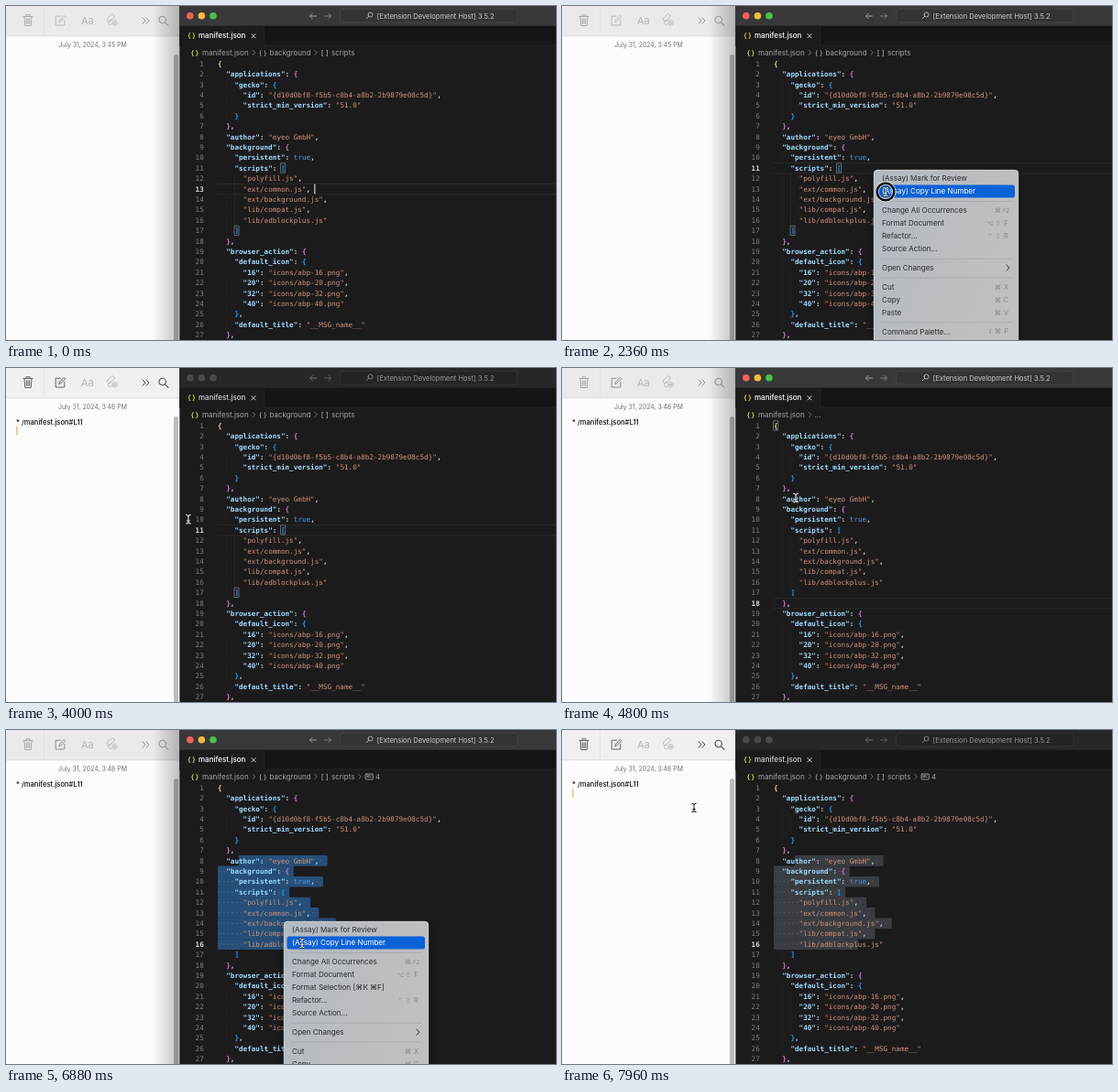
Animation, 600 px wide and 365 px high, one loop 8000 ms. Source, as an HTML page with a canvas:

```html
<!DOCTYPE html>
<html lang="en">
<head>
<meta charset="utf-8">
<title>Copy line number</title>
<style>
html, body { margin: 0; width: 100%; height: 100%; overflow: hidden; background: #1c1b1c; }
canvas { display: block; width: 600px; height: 365px; }
</style>
</head>
<body>
<canvas id="stage"></canvas>
<script>
const W = 600, H = 365, LOOP = 8000;
const canvas = document.getElementById('stage');
const ctx = canvas.getContext('2d');
const dpr = Math.max(1, window.devicePixelRatio || 1);
canvas.width = W * dpr;
canvas.height = H * dpr;

const UI = 'Inter, Roboto, sans-serif';
const MONO = '"DejaVu Sans Mono", monospace';
const SYMBOL = '"DejaVu Sans", sans-serif';
const EDGE = 189.5;
const LEFT = 231, CHAR = 4.6, TOP = 63, ROW = 11.4;
const BRACKETS = ['#e8d98a', '#da70d6', '#179fff'];

// A comma at the end of a line is followed by one space.
const code = `{
  "applications": {
    "gecko": {
      "id": "{d10d0bf8-f5b5-c8b4-a8b2-2b9879e08c5d}",
      "strict_min_version": "51.0"
    }
  },
  "author": "eyeo GmbH",
  "background": {
    "persistent": true,
    "scripts": [
      "polyfill.js",
      "ext/common.js",
      "ext/background.js",
      "lib/compat.js",
      "lib/adblockplus.js"
    ]
  },
  "browser_action": {
    "default_icon": {
      "16": "icons/abp-16.png",
      "20": "icons/abp-20.png",
      "32": "icons/abp-32.png",
      "40": "icons/abp-40.png"
    },
    "default_title": "__MSG_name__"
  },`.split('\n').map(line => line.endsWith(',') ? line + ' ' : line);

const tokens = tokenize(code);

// Pointer stops: time, x, y
const path = [
  [240, 536, 380], [1240, 340, 178], [1560, 340, 178], [2000, 353, 203],
  [2440, 353, 203], [2960, 137, 122], [3880, 137, 122], [4200, 330, 257],
  [4360, 330, 257], [4760, 255, 142], [5080, 255, 142], [5560, 324, 235],
  [5880, 324, 235], [6160, 302, 208], [6400, 302, 208], [6720, 323, 233],
  [7080, 323, 233], [7420, 139, 84], [7560, 139, 84], [7760, 144, 85]
];
// Click rings: start, end, is right button
const clicks = [
  [1360, 1560, true], [2240, 2400, false], [3000, 3160, false], [4240, 4360, false],
  [5080, 5680, false], [6200, 6360, true], [6920, 7080, false], [7440, 7560, false]
];
// Menus: open, close, x, y
const menus = [[1520, 2400, 340, 179], [6360, 7080, 303, 209]];

const within = (t, a, b) => t >= a && t < b;
const colX = col => LEFT + col * CHAR;
const rowY = line => TOP + (line - 1) * ROW;

function tokenize(lines) {
  let depth = 0;
  return lines.map(line => {
    const found = [];
    for (const m of line.matchAll(/"[^"]*"|true|[{}\[\]]|[:,]/g)) {
      const s = m[0];
      const isKey = s[0] === '"' && line[m.index + s.length] === ':';
      let color = '#d6d6d6', weight = 700;
      if (isKey) color = '#9cdcfe';
      else if (s[0] === '"') [color, weight] = ['#ce9178', 400];
      else if (s === 'true') [color, weight] = ['#569cd6', 400];
      else if ('{['.includes(s)) color = BRACKETS[depth++ % 3];
      else if ('}]'.includes(s)) color = BRACKETS[--depth % 3];
      found.push({ s, col: m.index, color, weight });
    }
    return found;
  });
}

function text(s, x, y, size, color, align = 'left', family = UI, weight = 400) {
  ctx.font = `${weight} ${size}px ${family}`;
  ctx.textRendering = family === MONO ? 'geometricPrecision' : 'auto';
  ctx.fillStyle = color;
  ctx.textAlign = align;
  ctx.textBaseline = 'alphabetic';
  ctx.fillText(s, x, y + size * 0.36);
}

function rect(x, y, w, h, color) {
  ctx.fillStyle = color;
  ctx.fillRect(x, y, w, h);
}

function round(x, y, w, h, r, fill, stroke) {
  ctx.beginPath();
  ctx.roundRect(x, y, w, h, r);
  if (fill) { ctx.fillStyle = fill; ctx.fill(); }
  if (stroke) { ctx.strokeStyle = stroke; ctx.lineWidth = 0.7; ctx.stroke(); }
}

function gradient(x0, y0, x1, y1, from, to) {
  const g = ctx.createLinearGradient(x0, y0, x1, y1);
  g.addColorStop(0, from);
  g.addColorStop(1, to);
  return g;
}

function circle(x, y, r, fill) {
  ctx.beginPath();
  ctx.arc(x, y, r, 0, Math.PI * 2);
  ctx.fillStyle = fill;
  ctx.fill();
}

function stroke(d, color, width = 1) {
  ctx.strokeStyle = color;
  ctx.lineWidth = width;
  ctx.lineCap = ctx.lineJoin = 'round';
  ctx.stroke(new Path2D(d));
}

function chevron(x, y, color = '#858585') {
  stroke(`M${x - 1.2} ${y - 2.5}l2.5 2.5l-2.5 2.5`, color, 0.8);
}

function lens(x, y, r, color, width, dir) {
  const k = r * 0.7;
  stroke(`M${x - r} ${y}a${r} ${r} 0 1 0 ${2 * r} 0a${r} ${r} 0 1 0 ${-2 * r} 0` +
    `M${x + dir * k} ${y + k}l${dir * r} ${r}`, color, width);
}

function pointer(t) {
  if (t < path[0][0]) return null;
  const i = path.findIndex(p => p[0] > t);
  if (i < 0) return path[path.length - 1].slice(1);
  const [t0, x0, y0] = path[i - 1], [t1, x1, y1] = path[i];
  const u = (t - t0) / (t1 - t0), e = u * u * (3 - 2 * u);
  return [x0 + (x1 - x0) * e, y0 + (y1 - y0) * e];
}

function stateAt(t) {
  const notes = within(t, 3120, 4280) || t >= 7480;
  const s = { notes, pos: pointer(t), line: 13, col: 23, since: 0, pair: 'scripts', crumbs: 'scripts' };
  if (t >= 1400) Object.assign(s, { line: 11, col: 16, since: 1400 });
  if (t >= 4280) Object.assign(s, { line: 18, col: 4, since: 4280, pair: 'root', crumbs: 'root' });
  if (t >= 5080) {
    const [x, y] = t < 5600 ? s.pos : [324, 235];
    s.line = Math.max(8, Math.round((y - TOP) / ROW) + 1);
    s.col = Math.min(Math.round((x - LEFT) / CHAR), code[s.line - 1].length);
    s.since = t;
    s.pair = '';
    s.selected = s.line > 8 || s.col > 5;
    if (t >= 5900) s.crumbs = 'item';
  }
  return s;
}

function drawNotes(t, active) {
  const pasted = t >= 3640;
  rect(0, 0, EDGE, H, '#fcfbfd');
  rect(0, 0, EDGE, 33, active ? '#f1eff1' : '#ebe9eb');
  rect(0, 32.5, EDGE, 0.8, '#dcdadc');
  rect(41, 0, 0.7, 33, '#e0dee0');
  round(183, 53, 5, H, 2.5, '#bcbbbd');
  if (!active) rect(160, 0, EDGE - 160, H, gradient(160, 0, EDGE, 0, 'rgba(0,0,0,0)', 'rgba(0,0,0,.24)'));

  const pale = '#b8b6b8';
  const bin = active ? '#565456' : '#a5a3a5';
  const compose = active ? '#565456' : pasted ? '#868486' : pale;
  const end = active ? '#4c4a4c' : '#969496';
  stroke('M19 11.5H29M22 11.3V9.7H26V11.3M20 11.7L20.8 21.5H27.2L28 11.7M22.3 13.8V19.3M24 13.8V19.3M25.7 13.8V19.3', bin, 0.9);
  stroke('M59.5 11.2H54.2V21H63.8V15.5M58 17.3L58.6 15.2L63.4 10.4L64.8 11.8L60 16.6Z', compose, 0.9);
  text('Aa', 82, 16, 11, pale);
  stroke('M113.2 17l4.5-4.5a2.2 2.2 0 0 0-3.1-3.1l-3.7 3.7a2.3 2.3 0 0 0 1 3.8M114.6 14.5l-2.5 2.5a2.2 2.2 0 0 0 3.1 3.1', pale, 0.9);
  stroke('M115.8 18.3a2.8 2.8 0 1 0 5.6 0a2.8 2.8 0 1 0-5.6 0M118.6 16.7V19.9M117 18.3H120.2', pale, 0.8);
  stroke('M149 12.7l3 3.3l-3 3.3M153 12.7l3 3.3l-3 3.3', end, 1);
  lens(170.7, 15, 3.7, end, 1.1, 1);

  text(`July 31, 2024, 3:4${pasted ? 6 : 5} PM`, 94.5, 43, 6.9, '#737174', 'center');
  if (pasted) text('* /manifest.json#L11', 11, 58.8, 7.6, '#0c0b0c', 'left', UI, 500);
  if (active) {
    const start = t >= 7480 ? 7520 : pasted ? 3640 : 3120;
    if (t >= start && (t - start) % 1000 < 500) rect(11.4, pasted ? 64 : 53.5, 1.1, 9.5, '#e9a92b');
  }
}

function drawChrome(s) {
  const on = !s.notes;
  rect(EDGE, 0, W, H, '#1c1b1c');
  rect(EDGE, 0, W, 43, '#161516');
  rect(EDGE, 0, W, 21.7, on ? '#383739' : '#272628');
  rect(EDGE, 42.7, W, 0.6, '#292829');
  rect(EDGE, 22, 92, 22, '#1c1b1c');
  rect(281.3, 22, 0.6, 21, '#292829');
  ['#f4605a', '#f6bd3b', '#43c645'].forEach((c, i) => circle(200.8 + 12.6 * i, 10.8, 3.8, on ? c : '#4b4a4b'));
  const nav = on ? '#a9a8a9' : '#767576';
  stroke('M331.5 11H338.5M334.2 8.3L331.5 11L334.2 13.7', nav, 0.9);
  stroke('M347.5 11H354.5M351.8 8.3L354.5 11L351.8 13.7', on ? '#858485' : '#646364', 0.9);
  round(364.5, 3.2, 193.5, 14.8, 3.5, on ? '#343335' : '#242325', on ? '#4b4a4c' : '#3b3a3c');
  const title = on ? '#cbcacb' : '#969596';
  lens(397.5, 9.5, 2.5, title, 0.8, -1);
  text('[Extension Development Host] 3.5.2', 468.5, 10.8, 7.55, title, 'center');

  text('{ }', 202.5, 32.4, 7.2, '#cbcb41', 'center', UI, 700);
  text('manifest.json', 210, 32.5, 8, on ? '#ffffff' : '#d5d4d5', 'left', UI, 500);
  stroke('M267.8 30.5l4.4 4.4M272.2 30.5l-4.4 4.4', '#dcdbdc', 0.9);
  drawCrumbs(s.crumbs);
}

function drawCrumbs(kind) {
  const y = 51, grey = '#a3a2a3';
  text('{ }', 206, y, 7.2, '#cbcb41', 'center', UI, 700);
  text('manifest.json', 214, y, 8.05, grey);
  chevron(270.5, y);
  if (kind === 'root') return text('...', 275.5, y, 8.05, grey);
  text('{ }', 280.3, y, 7.4, '#c5c4c5', 'center');
  text('background', 287.5, y, 8, grey);
  chevron(338, y);
  text('[ ]', 347.7, y, 7.6, '#c5c4c5', 'center');
  text('scripts', 355, y, 8, grey);
  if (kind !== 'item') return;
  chevron(386, y);
  round(392, 48, 8.4, 6, 1, null, '#c5c4c5');
  text('abc', 396.2, 51, 3.8, '#c5c4c5', 'center');
  text('4', 403, y, 8, grey);
}

function drawSelection(s) {
  const fill = s.notes ? '#393c40' : '#264f78';
  for (let n = 8; n <= s.line; n++) {
    const from = n === 8 ? 5 : 0;
    const last = n === s.line;
    const to = last ? s.col : code[n - 1].length;
    const w = (to - from + (last ? 0 : 1)) * CHAR;
    if (w > 0) round(colX(from), rowY(n) - ROW / 2, w, ROW + 0.2, 1.2, fill);
    for (let c = from; c < to; c++) {
      if (code[n - 1][c] === ' ') circle(colX(c + 0.5), rowY(n), 0.5, s.notes ? '#6c6e70' : '#6484a2');
    }
  }
}

function drawGuides(s) {
  code.forEach((line, i) => {
    const indent = line.search(/\S/);
    for (let c = 0; c < indent; c += 2) {
      const lit = c === 4 && within(i + 1, 12, 17) && s.pair === 'scripts';
      rect(colX(c), rowY(i + 1) - ROW / 2, 0.6, ROW, lit ? '#343334' : '#242324');
    }
  });
}

function drawEditor(t, s) {
  if (!s.selected) {
    for (const side of [-1, 1]) rect(230, rowY(s.line) + side * ROW / 2, W, 0.7, '#2f2e2f');
  }
  drawGuides(s);
  if (s.selected) drawSelection(s);
  const pairs = { scripts: [[11, 15], [17, 4]], root: [[1, 0]] }[s.pair] || [];
  for (const [n, c] of pairs) {
    ctx.strokeStyle = '#7f8c95';
    ctx.lineWidth = 0.7;
    ctx.strokeRect(colX(c), rowY(n) - 5.2, CHAR, 10.4);
  }
  tokens.forEach((row, i) => {
    const y = rowY(i + 1), current = i + 1 === s.line;
    text(String(i + 1), 215.8, y, 7.64, current ? '#d8d7d8' : '#7a7f85', 'right', MONO, current ? 700 : 400);
    for (const k of row) text(k.s, colX(k.col), y, 7.64, k.color, 'left', MONO, k.weight);
  });
  if (!s.notes && (t - s.since) % 1000 < 500) rect(colX(s.col) - 0.5, rowY(s.line) - 5.3, 1.1, 10.8, '#e4e3e4');
}

function menuItems(hasSelection) {
  return [
    ['(Assay) Mark for Review'], ['(Assay) Copy Line Number'], null,
    ['Change All Occurrences', '⌘', 'F2'], ['Format Document', '⌥⇧', 'F'],
    ...(hasSelection ? [['Format Selection [⌘K ⌘F]']] : []),
    ['Refactor...', '⌃⇧', 'R'], ['Source Action...'], null,
    ['Open Changes', '>'], null,
    ['Cut', '⌘', 'X'], ['Copy', '⌘', 'C'], ['Paste', '⌘', 'V'], null,
    ['Command Palette...', '⇧⌘', 'P']
  ];
}

function drawMenu(x, y, pos, hasSelection) {
  ctx.save();
  ctx.shadowColor = 'rgba(0,0,0,.5)';
  ctx.shadowBlur = 8 * dpr;
  ctx.shadowOffsetY = 3 * dpr;
  round(x, y, 158, 230, 4, gradient(x, y, x + 158, y + 60, '#b2bac1', '#bfbfc0'));
  ctx.restore();
  round(x + 0.3, y + 0.3, 157.4, 230, 4, null, '#d2d4d6');

  let cy = y + 9.6;
  for (const item of menuItems(hasSelection)) {
    if (!item) {
      rect(x + 8, cy - 3.6, 142, 0.7, '#a1a4a7');
      cy += 6.8;
      continue;
    }
    const [label, mods = '', key = ''] = item;
    const hot = pos[0] > x + 3 && Math.abs(pos[1] - cy) < 6.95;
    if (hot) round(x + 3.5, cy - 7, 150.5, 14, 2.5, '#0b62d8');
    const ink = hot ? '#ffffff' : '#282a2c', soft = hot ? '#d5e4f8' : '#85888b';
    text(label, x + 9, cy, 8.05, ink);
    if (mods === '>') {
      stroke(`M${x + 145} ${cy - 3}l3 3l-3 3`, ink, 1);
    } else {
      [...mods].forEach((m, i) => text(m, x + 135.5 - (mods.length - 1 - i) * 8.5, cy, 7.4, soft, 'center', SYMBOL));
      text(key, x + 144.5, cy, key.length > 1 ? 6 : 7.4, soft, 'center');
    }
    cy += 14;
  }
}

function drawPointer(t, pos) {
  if (!pos) return;
  const [x, y] = pos, light = x < EDGE;
  const click = clicks.find(c => within(t, c[0], c[1]));
  if (click) {
    for (const [color, width] of [['#f2f4f2', 3.9], [click[2] ? '#20b526' : '#080808', 2.6]]) {
      ctx.beginPath();
      ctx.arc(x, y, 9.3, 0, Math.PI * 2);
      ctx.strokeStyle = color;
      ctx.lineWidth = width;
      ctx.stroke();
    }
  }
  const beam = `M${x - 2.3} ${y - 4.8}q2.3 0 2.3 1.6q0-1.6 2.3-1.6M${x} ${y - 3.4}v6.8M${x - 2.3} ${y + 4.8}q2.3 0 2.3-1.6q0 1.6 2.3 1.6M${x - 1.3} ${y + 1.6}h2.6`;
  stroke(beam, light ? '#ffffff' : '#353435', 2.2);
  stroke(beam, light ? '#1a191a' : '#e9e8e9', 1);
}

function draw(t) {
  const s = stateAt(t);
  ctx.setTransform(dpr, 0, 0, dpr, 0, 0);
  drawNotes(t, s.notes);
  drawChrome(s);
  drawEditor(t, s);
  const menu = menus.find(m => within(t, m[0], m[1]));
  if (menu) drawMenu(menu[2], menu[3], s.pos, s.selected);
  drawPointer(t, s.pos);
}

const start = performance.now();
function tick() {
  draw((performance.now() - start) % LOOP);
  requestAnimationFrame(tick);
}
tick();
</script>
</body>
</html>
```
